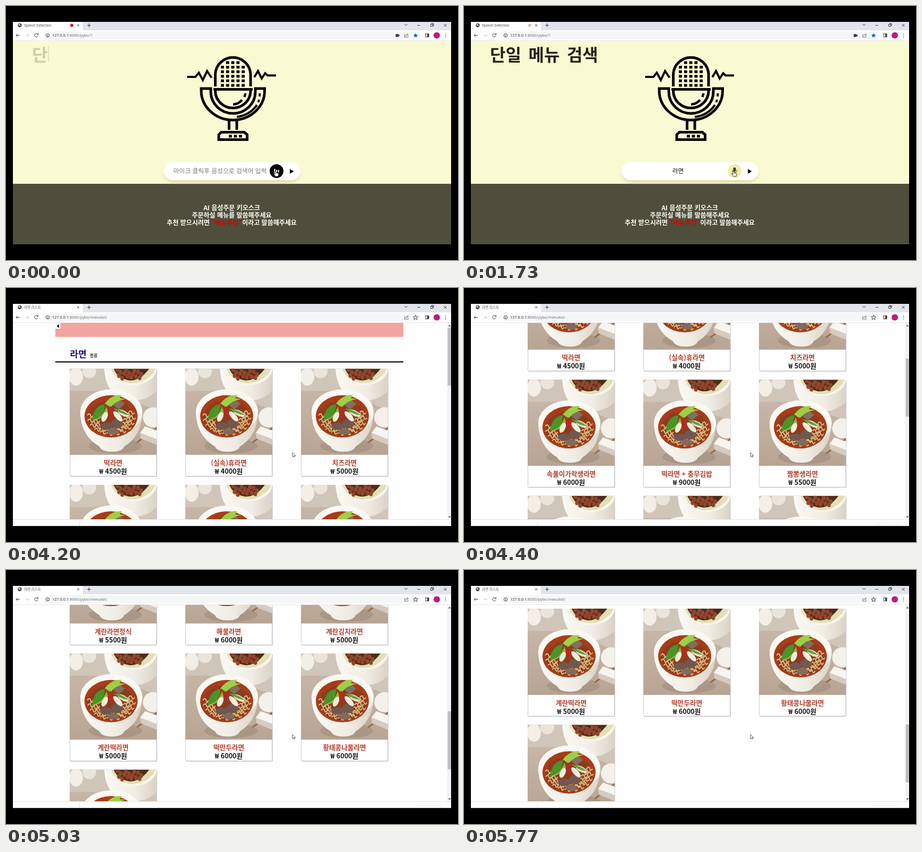
Recreate the animation shown at these times as an HTML page. Size 852 px wide and 480 px high, loop 5810 ms.

```html
<!DOCTYPE html>
<html lang="ko">
<head>
<meta charset="utf-8">
<title>Voice order kiosk</title>
<style>
  html, body { margin: 0; width: 100%; height: 100%; overflow: hidden; background: #000; }
  svg { display: block; width: 852px; height: 480px; }
  text { font-family: "Noto Sans CJK KR", "Noto Sans CJK", "Noto Sans", sans-serif; white-space: pre; }
  .ui { font-family: Roboto, "Noto Sans CJK KR", "Noto Sans CJK", sans-serif; }
  .mid { text-anchor: middle; }
  .b { font-weight: 700; }
  .line { fill: none; stroke: #3c3c40; stroke-width: 1; }
  .ink { fill: none; stroke: #050505; stroke-width: 5; }
</style>
</head>
<body>
<svg id="stage" viewBox="0 0 852 480">
  <defs>
    <clipPath id="window"><rect x="13" y="30" width="826" height="419.500"/></clipPath>
    <clipPath id="view"><rect x="13" y="66" width="819" height="371"/></clipPath>
    <clipPath id="photoBox"><rect width="164" height="163"/></clipPath>
    <linearGradient id="cloth" x2="0" y2="1">
      <stop offset="0" stop-color="#cbbcae"/><stop offset="1" stop-color="#b8a493"/>
    </linearGradient>
    <linearGradient id="china">
      <stop offset="0" stop-color="#fbf9f4"/><stop offset=".6" stop-color="#f0ece4"/><stop offset="1" stop-color="#dad2c6"/>
    </linearGradient>
    <filter id="soft" x="-20%" y="-50%" width="140%" height="220%"><feGaussianBlur stdDeviation="4"/></filter>

    <g id="photo" clip-path="url(#photoBox)">
      <rect width="164" height="163" fill="url(#cloth)"/>
      <path d="M0 42H70L164 78V0H0Z" fill="#d0c5b9"/>
      <ellipse cx="12" cy="15" rx="13" ry="17" fill="#f3eee6"/>
      <ellipse cx="37" cy="5" rx="13" ry="13" fill="#ebe4da"/>
      <path d="M65 0Q68 48 104 58Q140 66 164 42V0Z" fill="url(#china)"/>
      <ellipse cx="118" cy="0" rx="46" ry="31" fill="#f8f5ee"/>
      <path d="M78 0Q86 22 112 27Q138 30 158 8L162 0Z" fill="#e2dfb4"/>
      <path d="M83 0Q90 18 112 22Q132 24 150 0Z" fill="#4d2c1a"/>
      <g id="beans"></g>
      <circle cx="157" cy="92" r="19" fill="#f4f0ea"/>
      <path d="M126 140L164 112" stroke="#9a6a48" stroke-width="3"/>
      <path d="M133 121L142 109L164 117V143L135 132Z" fill="#f8f5f0"/>
      <path d="M133 121L164 133V144L134 132Z" fill="#d6cbc0"/>
      <ellipse cx="86" cy="146" rx="50" ry="14" fill="#9c8878" opacity=".5"/>
      <path d="M20 80Q20 126 56 147Q60 157 80 157Q99 157 103 147Q137 126 137 80Z" fill="url(#china)"/>
      <ellipse cx="78.500" cy="82" rx="58.500" ry="43" fill="#faf8f2"/>
      <ellipse cx="78" cy="90" rx="50" ry="40" fill="#a83c18"/>
      <ellipse cx="78" cy="93" rx="44" ry="33" fill="#8c3c1e"/>
      <g id="noodles" fill="none" stroke="#e0bd80" stroke-width="2"></g>
      <g fill="#705850">
        <ellipse cx="69" cy="109" rx="12" ry="7"/><ellipse cx="89" cy="104" rx="11" ry="9"/>
        <ellipse cx="82" cy="119" rx="11" ry="6" fill="#846a5c"/>
      </g>
      <path d="M74 62L92 56L104 67L92 77Z" fill="#80705f"/>
      <path d="M42 98Q45 70 66 67Q67 91 42 98Z" fill="#4a9428"/>
      <path d="M50 96Q66 86 70 68L76 70Q72 92 50 96Z" fill="#82bd3a"/>
      <path d="M66 66Q80 48 98 50L94 56L106 57Q86 61 78 72Z" fill="#9cd045"/>
      <path d="M68 67L84 79L80 97L73 84Z" fill="#b52a20"/>
      <ellipse cx="66" cy="91" rx="5" ry="10" transform="rotate(25 66 91)" fill="#f3eedb"/>
      <ellipse cx="91" cy="90" rx="5" ry="12" transform="rotate(-42 91 90)" fill="#f3eedb"/>
      <ellipse cx="101" cy="84" rx="5" ry="12" transform="rotate(-62 101 84)" fill="#e9e4cf"/>
      <path d="M82 75Q100 77 112 88Q96 86 82 75Z" fill="#5fa236"/>
    </g>
  </defs>

  <rect width="852" height="480"/>
  <g clip-path="url(#window)">
    <rect x="13" y="30" width="826" height="420" fill="#fff"/>

    <g id="searchPage">
      <rect x="13" y="66" width="826" height="270" fill="#fafad2"/>
      <rect x="13" y="336" width="826" height="114" fill="#4f4e3c"/>
      <text id="title" class="b" x="49" y="104" font-size="32" word-spacing="4.6" fill="#23230f"></text>
      <rect id="caret" y="76" width="1" height="29" fill="#8c8a60"/>
      <g id="middle">
        <g id="microphone"></g>
        <g class="mid b" font-size="12" fill="#fffff6">
          <text x="425.500" y="385.500">AI 음성주문 키오스크</text>
          <text x="425.500" y="399.700">주문하실 메뉴를 말씀해주세요</text>
          <text x="425.500" y="414">추천 받으시려면 <tspan fill="#d80000">"메뉴추천"</tspan>이라고 말씀해주세요</text>
        </g>
      </g>
      <g id="bar">
        <rect x="300" y="303" width="252" height="30" rx="15" fill="#a8a56a" opacity=".4" filter="url(#soft)"/>
        <rect x="297" y="295" width="258" height="34" rx="17" fill="#fff"/>
        <text id="hint" class="mid" x="403.500" y="315.500" font-size="11.800" fill="#777774">마이크 클릭후 음성으로 검색어 입력</text>
        <text id="query" class="mid" x="403.500" y="316" font-size="11.800" fill="#11110c">라면</text>
        <circle id="hover" cy="312" r="13" fill="#f3edaa"/>
        <g id="micIcon">
          <rect x="507.500" y="305" width="5" height="8" rx="2.500" fill="#3a392b"/>
          <path d="M505.500 310.500a4.500 4.500 0 0 0 9 0M510 315v3" class="line"/>
        </g>
        <g id="listening">
          <circle cx="510" cy="312" r="13" fill="#050505"/>
          <g id="levels" fill="#fff"></g>
        </g>
        <path d="M535 308L542.500 312.500L535 317Z" fill="#050505"/>
      </g>
    </g>

    <g id="menuPage" clip-path="url(#view)">
      <rect x="13" y="66" width="826" height="371" fill="#fefefe"/>
      <g id="list">
        <rect x="93" y="66" width="656" height="26.500" fill="#f2a4a0"/>
        <rect x="93" y="66.500" width="9.500" height="10.500" fill="#fff"/>
        <path d="M100 68.500V75.500L95.500 72Z"/>
        <text class="b" x="120.500" y="131" font-size="17" fill="#1c0c8c">라면</text>
        <text class="b" x="158" y="131" font-size="8" fill="#2c2c2c">종류</text>
        <rect x="93" y="138.500" width="656" height="2.300" fill="#111"/>
        <g id="cards"></g>
      </g>
    </g>

    <g id="scrollbar">
      <rect x="831.500" y="66" width="8" height="371" fill="#f3f3f5"/>
      <rect id="thumb" x="832.500" width="6.500" fill="#bfbfc3"/>
      <path d="M833.500 72.500L836 69.500L838.500 72.500ZM833.500 431.500L836 434.500L838.500 431.500Z" fill="#55555a"/>
    </g>
    <g id="shelf">
      <rect x="13" y="437" width="826" height="13" fill="#fff"/>
      <path d="M13 437.500H839M138.500 440V449" stroke="#e4e4e8" fill="none"/>
      <path d="M776 444.500H820" stroke="#e8e8ec" stroke-dasharray="3 2"/>
    </g>
    <g id="status">
      <rect x="13" y="426" width="273.500" height="11.500" rx="2" fill="#e2e4e8"/>
      <text class="ui" x="46" y="434" font-size="6.500" fill="#6a6a70">127.0.0.1:8000/687b18c6-7eb3-4687-a794-ed547352e5f3</text>
    </g>
    <g id="download">
      <circle cx="30" cy="428" r="18" fill="#fcfcf0"/>
      <path d="M27.500 422H32.500V427H36L30 433.500L24 427H27.500Z" fill="#2c6aa6"/>
      <rect x="21.500" y="440" width="17" height="2.200" fill="#2c6aa6"/>
    </g>

    <rect x="13" y="30" width="826" height="16" fill="#e2e4ec"/>
    <path d="M13 30H141Q145 30 145 34V46H13Z" fill="#fff"/>
    <rect x="13" y="46" width="826" height="20" fill="#fff"/>
    <rect x="70" y="48" width="712" height="15" rx="7.500" fill="#f5f6f8"/>
    <path d="M13 65.500H839" stroke="#e6e6ec"/>
    <g id="globe"><circle cx="26" cy="36.500" r="3.700" fill="#4a4a4e"/><path d="M23.500 35l2.500-1 1 2-2 1ZM26.500 38l2-1v2Z" fill="#fff"/></g>
    <path id="spinner" class="line" d="M26 33.500a3 3 0 0 1 3 3"/>
    <text id="tabName" class="ui" x="34" y="39" font-size="6.600" fill="#55555a"></text>
    <circle id="record" cx="124" cy="36.500" r="3" fill="#cf1c14"/>
    <g class="line">
      <path d="M134 34.500l4 4m0-4l-4 4M153 36.500h7m-3.500-3.500v7M751 34l3 3 3-3M775.500 36.500h5M825.500 34l5 5m0-5l-5 5"/>
      <path d="M800.500 34.500h4v4h-4ZM802 34.500v-1.500h4v4h-1.500"/>
      <path d="M26 55.500h-7m3-3l-3 3 3 3"/>
      <path d="M36 55.500h7m-3-3l3 3-3 3" opacity=".25"/>
      <path id="reload" d="M60 53.500a3.300 3.300 0 1 0 .3 3M60.500 51.500v2.500h-2.500"/>
      <path id="stop" d="M54 52.500l6 6m0-6l-6 6"/>
      <circle cx="78.500" cy="55.500" r="3.200"/><path d="M78.500 54.500v3"/>
      <path d="M753 54h-1.500v5h6.500v-2M753.500 57q0-3 4-3m-1.500-2l2.500 2-2.500 2" opacity=".7"/>
      <rect x="791" y="52.500" width="6" height="6"/>
    </g>
    <path d="M794 52.500h3v6h-3ZM828 52h1.300v1.300h-1.300ZM828 55h1.300v1.300h-1.300ZM828 58h1.300v1.300h-1.300Z" fill="#3c3c40"/>
    <path id="camera" d="M734.500 53h5v1.500l2-1v4.500l-2-1v1.500h-5Z" fill="#3c3c40"/>
    <path id="star" d="M772 51.200l1.300 2.900 3.100.3-2.300 2.100.7 3.100-2.800-1.600-2.800 1.600.7-3.100-2.300-2.100 3.100-.3Z"/>
    <circle cx="812" cy="55.500" r="6" fill="#c2187b"/>
    <text class="ui" x="87" y="58.300" font-size="7.500" fill="#3c3c40">127.0.0.1<tspan id="path" fill="#77777c"></tspan></text>
  </g>

  <g id="hand" fill="#fff" stroke="#111" stroke-width=".8">
    <path d="M-1-5q1-1 2 0v3l4 1q1 0 1 2l-1 4h-5l-4-5q1-1 3 1Z"/>
  </g>
  <path id="arrow" d="M540 311v8l2-1.800 1.200 2.600 1.300-.6-1.200-2.500h2.500Z" fill="#fff" stroke="#222" stroke-width=".7"/>
</svg>

<script>
const LOOP = 5810;
const HEARD = 800;     // spoken word recognised, recording ends
const SUBMIT = 2770;   // play button pressed, download shelf opens
const MENU = 3550;     // menu page replaces the search page
const SCROLL = { start: 4250, length: 1520, distance: 738 };
const TITLE = "단일 메뉴 검색";
const KEY_TIME = 150;
const ROW = 219.5;
const MENUS = [
  ["떡라면", 4500], ["(실속)휴라면", 4000], ["치즈라면", 5000],
  ["속풀이가락생라면", 6000], ["떡라면 + 충무김밥", 9000], ["짬뽕생라면", 5500],
  ["계란라면정식", 5500], ["해물라면", 6000], ["계란김치라면", 5000],
  ["계란떡라면", 5000], ["떡만두라면", 6000], ["황태콩나물라면", 6000],
  ["라면", 4500]
];

const $ = id => document.getElementById(id);
const show = (id, on) => $(id).style.display = on ? "" : "none";
const move = (id, x, y) => $(id).setAttribute("transform", `translate(${x} ${y})`);
const clamp = x => Math.max(0, Math.min(1, x));
const easeInOut = x => x * x * (3 - 2 * x);
const easeOut = x => 1 - (1 - x) ** 3;
const repeat = (n, draw) => Array.from({ length: n }, (_, i) => draw(i)).join("");

function drawMicrophone() {
  const dot = (x, y) => `<rect x="${x - 3}" y="${y - 2.6}" width="5.800" height="5.200"/>`;
  const grille = repeat(6, r => repeat(5, c =>
    r || (c > 0 && c < 4) ? dot(408 + c * 9.8, 107 + r * 8.6) : ""));
  const base = repeat(3, i => dot(423 + i * 9.5, 246));
  $("microphone").innerHTML = `${grille}${base}<g class="ink">
    <path d="M394.500 152V128.500A33.300 33 0 0 1 461 128.500V152"/>
    <path d="M391 157.500H465M394.500 157V162A33.300 32.500 0 0 0 461 162V157"/>
    <path d="M386 156V162A42 41 0 0 0 470 162V156H487.500V160A59.700 55.500 0 0 1 368 160V156H388.500"/>
    <path d="M420.500 213V234M435 213V234"/>
    <path d="M401 252.500V243L406 238.500H449L454.500 243V252.500Z"/>
    <path d="M428 186Q438 185.500 445 177.500M449.500 172L451.500 165" stroke-width="4.500" stroke-dasharray="20 3 5.500 9"/>
    <path d="M435 209.500Q459 207 473 187M475.500 182L477 177M478 171L478.500 165" stroke-width="4"/>
    <path d="M341.500 134H357L363.500 126L371 140L379 123L387.500 135.500M468 134.500L475 123L482 137L488.500 127L493 131.300H509" stroke-width="4"/>
  </g>`;
}

function drawPhotoDetails() {
  $("beans").innerHTML = repeat(15, i => {
    const x = 90 + (i * 13) % 49, y = 2 + (i * 7) % 17;
    return `<ellipse cx="${x}" cy="${y}" rx="3.500" ry="4.500" fill="${i % 3 ? "#8a4a30" : "#a03c28"}"/>`;
  });
  $("noodles").innerHTML = repeat(34, i => {
    const a = -0.3 + i * 0.108, r = 1 - 0.28 * (i % 3) / 2;
    const x = 78 + 40 * r * Math.cos(a), y = 92 + 31 * r * Math.sin(a);
    return `<path d="M${x - 5} ${y}q4-6 6 0t5 0"/>`;
  });
}

function drawCards() {
  $("cards").innerHTML = MENUS.map(([name, price], i) => {
    const x = 120 + (i % 3) * 218, y = 152.5 + Math.floor(i / 3) * ROW;
    return `<g transform="translate(${x} ${y})">
      <rect x="1" y="1" width="164" height="203.500" rx="1.500" fill="#d6d6e0"/>
      <rect x=".5" y=".5" width="163" height="202.500" rx="1.500" fill="#fff" stroke="#c6c6d2"/>
      <use href="#photo"/>
      <g class="mid b" font-size="12.600">
        <text x="82" y="182.500" fill="#b43a2a">${name}</text>
        <text x="82" y="198.500" fill="#141414">₩ ${price}원</text>
      </g></g>`;
  }).join("");
}

function drawTitle(t) {
  const count = Math.min(TITLE.length, 1 + Math.floor(t / KEY_TIME));
  $("title").textContent = TITLE.slice(0, count);
  const ink = 0.2 + 0.8 * clamp(t / 120);
  $("title").setAttribute("opacity", ink);
  $("caret").setAttribute("x", 50 + $("title").getComputedTextLength());
  $("caret").setAttribute("opacity", Math.max(0.4, ink));
  show("caret", count < TITLE.length);
}

function drawSearch(t) {
  const sent = t >= SUBMIT, listening = t < HEARD;
  drawTitle(t);
  move("middle", sent ? -4.5 : 0, 0);
  move("bar", sent ? -4.5 : 0, sent ? -20 : 0);
  show("hint", listening);
  show("query", !listening);
  show("listening", listening);
  show("micIcon", !listening);

  const glide = easeInOut(clamp((t - 1970) / 530));
  const handX = 508 + 31 * glide;
  move("hand", handX, 317 - 2 * glide);
  const overMic = handX < 523, overPlay = handX > 526;
  show("hover", !listening && !sent && (overMic || overPlay));
  $("hover").setAttribute("cx", overMic ? 510 : 538);

  $("levels").innerHTML = repeat(3, i => {
    const h = 6 + 2.5 * Math.cos(t / 110 + i * 2.1);
    return `<rect x="${505.5 + i * 3.6}" y="${312 - h / 2}" width="2" height="${h}"/>`;
  });
}

function drawBrowser(t) {
  const sent = t >= SUBMIT, menu = t >= MENU, loading = sent && !menu;
  show("searchPage", !menu);
  show("menuPage", menu);
  show("scrollbar", sent);
  show("shelf", sent);
  show("status", loading);
  show("hand", !sent);
  show("arrow", sent);
  show("globe", !loading);
  show("spinner", loading);
  show("reload", !loading);
  show("stop", loading);
  show("record", !menu);
  show("camera", !menu);
  $("spinner").setAttribute("transform", `rotate(${t * 0.4 - 1270} 26 36.500)`);
  $("record").setAttribute("opacity", sent ? 1 : 1 - 0.75 * clamp((t - HEARD) / 1000));
  $("tabName").textContent = menu ? "라면 리스트" : "Speech Detection";
  $("path").textContent = menu ? ":8000/pybo/menulist/" : ":8000/pybo/?";
  $("star").setAttribute("fill", menu ? "none" : "#1a66b8");
  $("star").setAttribute("stroke", menu ? "#45454a" : "none");

  const fall = clamp((t - SUBMIT) / 600);
  show("download", loading && fall < 1);
  move("download", 0, 36 * fall - 10);
  $("download").setAttribute("opacity", Math.min(1, 5 * fall * (1 - fall)));
}

function drawScroll(t) {
  const { start, length, distance } = SCROLL;
  const menu = t >= MENU, scroll = distance * easeOut(clamp((t - start) / length));
  move("list", 0, -scroll);
  $("thumb").setAttribute("y", 75 + scroll * 0.294);
  $("thumb").setAttribute("height", menu ? 109.5 : 341);
}

function render(t) {
  drawBrowser(t);
  drawSearch(t);
  drawScroll(t);
  if (t >= MENU) show("hand", false);
}

drawMicrophone();
drawPhotoDetails();
drawCards();
const start = performance.now();
function tick() {
  render((performance.now() - start) % LOOP);
  requestAnimationFrame(tick);
}
render(0);
requestAnimationFrame(tick);
</script>
</body>
</html>
```
